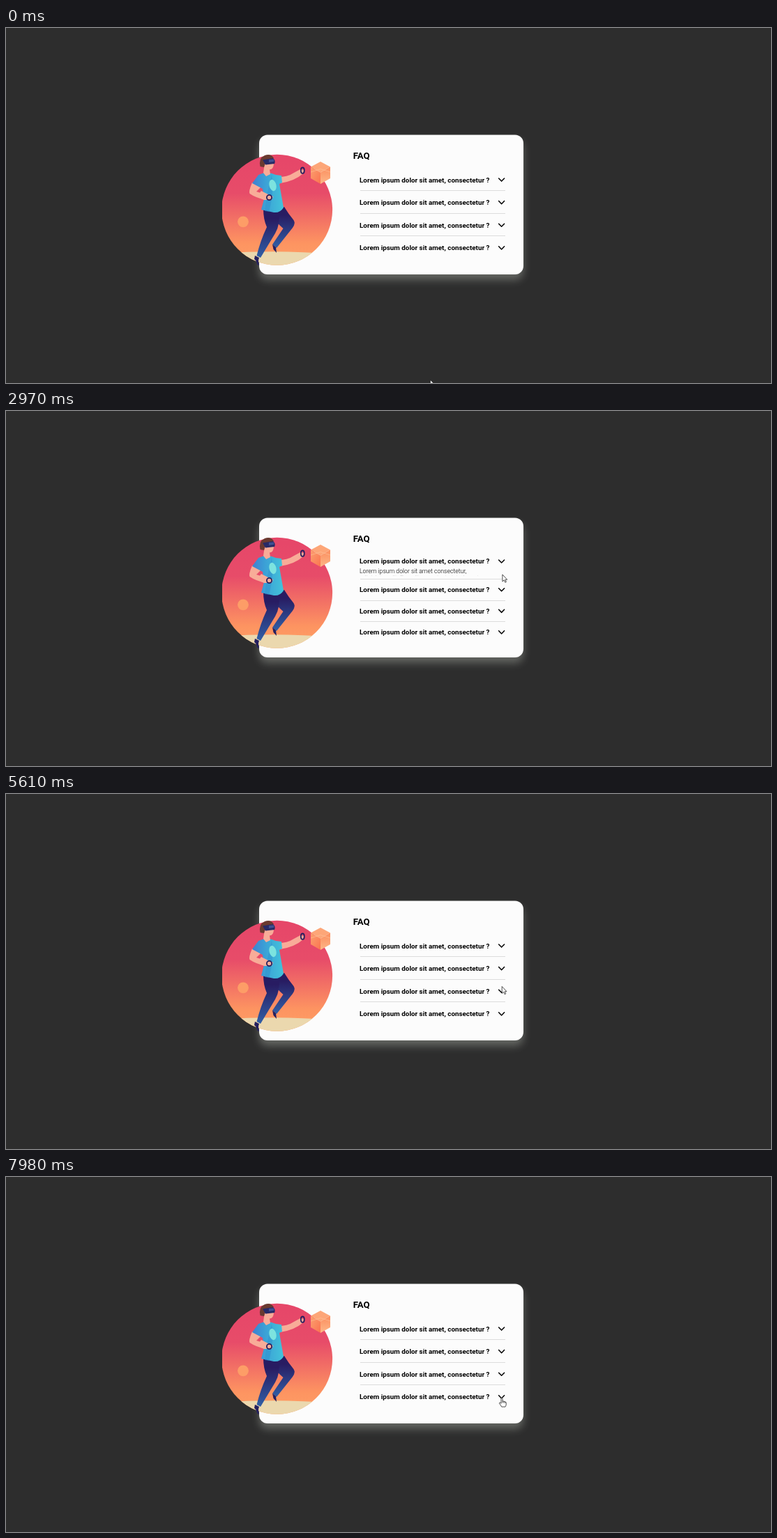
An HTML page for the animation above (8000 ms loop, 1097 by 510 pixels).

```html
<!DOCTYPE html>
<html lang="en">
<head>
<meta charset="utf-8">
<title>FAQ accordion</title>
<style>
  html, body { margin: 0; width: 100%; height: 100%; overflow: hidden; background: #2d2d2d; }
  svg { display: block; width: 1097px; height: 510px; font-family: Roboto, sans-serif; }
  .card { fill: #fcfcfc; filter: drop-shadow(0 8px 6px rgba(205, 212, 198, .34)); }
  .heading { font-size: 13.2px; font-weight: 700; }
  .question { font-size: 9.83px; font-weight: 700; }
  .answer { font-size: 8.7px; font-weight: 300; }
  .rule { stroke: #dcdcdc; }
  .chevron { fill: none; stroke: #000; stroke-width: 1.5; stroke-linecap: round; stroke-linejoin: round; }
  .skin { fill: #f8ac98; }
  .navy { fill: #25205f; }
</style>
</head>
<body>
<svg viewBox="0 0 1097 510">
  <defs>
    <linearGradient id="sky" x2="0" y2="1">
      <stop offset=".05" stop-color="#e64769"/>
      <stop offset=".35" stop-color="#e74c69"/>
      <stop offset=".8" stop-color="#fd9461"/>
      <stop offset="1" stop-color="#fea066"/>
    </linearGradient>
    <linearGradient id="shirt">
      <stop offset="0" stop-color="#3f7fd0"/>
      <stop offset=".4" stop-color="#3ba0d6"/>
      <stop offset="1" stop-color="#43c3da"/>
    </linearGradient>
    <linearGradient id="pants" x2="0" y2="1">
      <stop offset=".2" stop-color="#281c62"/>
      <stop offset="1" stop-color="#315fa6"/>
    </linearGradient>
    <linearGradient id="side" x2="1" y2="1">
      <stop offset="0" stop-color="#fba06f"/>
      <stop offset="1" stop-color="#fb7450"/>
    </linearGradient>
    <linearGradient id="front" x2="0" y2="1">
      <stop offset="0" stop-color="#fb8d5e"/>
      <stop offset="1" stop-color="#fdb787"/>
    </linearGradient>
    <clipPath id="frame"><path d="M310 150H480V350H310z"/></clipPath>
    <clipPath id="disc"><circle cx="388.6" cy="261.3" r="79.5"/></clipPath>
  </defs>

  <rect class="card" x="363" y="153.5" width="379" height="200.5" rx="12"/>

  <g clip-path="url(#frame)">
    <circle cx="388.6" cy="261.3" r="79.5" fill="url(#sky)"/>
    <path d="M305 324Q390 318 470 325V345H305z" fill="#ebd8ae" clip-path="url(#disc)"/>
    <circle cx="340" cy="278.3" r="7.9" fill="#fd9d67"/>
  </g>

  <g>
    <path d="M451 192 465 199.5 451 207.5 437 199.5z" fill="#fda678"/>
    <path d="M437 199.5 451 207.5V224L437 216z" fill="url(#side)"/>
    <path d="M465 199.5 451 207.5V224L465 216z" fill="url(#front)"/>
    <path d="M437 207 451 202.5 465 207" fill="none" stroke="#fec39b" stroke-width=".6"/>
  </g>

  <g>
    <path d="M384 261 399 257Q405 267 412.5 276Q415.5 281 411 287L388 316 382 311 397.5 288Q389 281 384 272z" fill="url(#pants)"/>
    <path d="M369 260 391 262Q394 281 386 295L365 330 359.5 327Q365 305 374 286Q369 275 369 260z" fill="url(#pants)"/>
    <path class="navy" d="M382 311 387 315 388 323 383.5 318zM357 327 363 330Q361 335 363 341L360.5 340Q359 334 356 332z"/>
    <path class="skin" d="M390 214Q404 214 411 209L422 203 427 204 426 209Q414 220 393 223z"/>
    <path class="skin" d="M353 222 366 228 359 235 375 240 382 241 382 246 374 247.5Q358 244 349.5 238Q347.5 235 353 222z"/>
    <path d="M362 211Q374 205 387 211L395 212 396 222 392 224 398 258Q393 266 384 265L366 261 370 246 368 231 353 223z" fill="url(#shirt)"/>
    <path d="M381 211Q385 235 377 264L371 263 374 240z" fill="#2e8dcd" opacity=".45"/>
    <path class="skin" d="M366 234 378 240 383 242 381 247 370 247 360 242z"/>
    <ellipse cx="382.5" cy="226" rx="5" ry="8.3" transform="rotate(-14 382.5 226)" fill="#7ce3df"/>
    <path class="skin" d="M371 194 384 194Q384 203 378 203.5L379 210 373 213 369 208z"/>
    <path d="M364.5 199Q362 187 371 183Q380 180 384 187L373 190 370 200z" fill="#6a3a30"/>
    <path d="M368 189.5 383 187Q387 190 385 195L372 196.5z" fill="#282a66"/>
    <path d="M377 189 384.5 188.5 384 192 377 193z" fill="#405092"/>
    <g fill="none" stroke="#25205f" stroke-width="1.8">
      <ellipse cx="425.3" cy="204.7" rx="2.5" ry="4.2"/>
      <circle cx="377.5" cy="243.5" r="3.6"/>
    </g>
  </g>

  <text class="heading" x="497.7" y="187.8">FAQ</text>
  <g id="list"></g>

  <g id="pointer" stroke="#222" stroke-width=".8" stroke-linejoin="round" fill="#fff">
    <path data-kind="arrow" d="M.4.4V10.4L2.8 8.3 4.3 11.7 5.9 11 4.4 7.7H7.2z"/>
    <path data-kind="hand" d="M-1 1Q0-.5 1 1V5.2Q2.2 4.4 3 5.6Q4.3 5 5 6.2Q6.2 6 6.2 7.5V10Q6 11.6 5 13.2H-.3Q-1.2 11.3-3.6 8.2Q-3.6 6.7-2.2 7.2L-1 8.4zM1 5.2V7.6M3 5.6V7.8M5 6.2V8"/>
    <path data-kind="beam" d="M-2-7H-.5L0-6.5.5-7H2M0-6.5V6.5M-2 7H-.5L0 6.5.5 7H2" fill="none"/>
  </g>
</svg>

<script>
const LOOP = 8000, FADE = 500, OPEN_HEIGHT = 55;
const ROW_TOP = 218.1, ROW_STEP = 32.6;
const QUESTION = 'Lorem ipsum dolor sit amet, consectetur ?';
const ANSWER = [
  'Lorem ipsum dolor sit amet consectetur,',
  'adipisicing elit. Expedita nesciunt sint placeat',
  'tempora ipsum? Facere eum quos ducimus ea.',
  'Magnam cum voluptas iste iure unde repudiandae',
  'numquam error.'
];

// Row, time of the opening click, time of the closing click
const toggles = [[0, 1534, 2715], [1, 3752, 4955], [2, 6065, 7190]];

// Time, x, y, pointer kind from then on
const moves = [
  [0, 608, 505, 'arrow'], [430, 608, 505, 'arrow'], [640, 552, 440, 'arrow'],
  [760, 544, 390, 'arrow'], [1000, 610, 280, 'arrow'], [1230, 660, 220, 'beam'],
  [1560, 660, 219, 'beam'], [1680, 661, 215.5, 'arrow'], [1900, 661, 215.5, 'arrow'],
  [2060, 663, 209, 'beam'], [2550, 663, 209, 'beam'], [2650, 706, 206, 'hand'],
  [2780, 715, 211, 'hand'], [2880, 713, 226, 'arrow'], [2970, 711.5, 234.5, 'arrow'],
  [3250, 711, 246, 'hand'], [3750, 711, 250, 'hand'], [3820, 710.5, 251, 'arrow'],
  [4200, 712, 260, 'arrow'], [4500, 711, 252, 'arrow'], [4800, 709, 234, 'hand'],
  [5060, 708.5, 233.5, 'hand'], [5250, 710, 248, 'arrow'], [5700, 711, 283, 'hand'],
  [6060, 711, 288, 'hand'], [6180, 711, 289.5, 'arrow'], [6500, 711, 289.5, 'arrow'],
  [6850, 711, 252, 'hand'], [7260, 711, 253, 'arrow'], [7500, 711, 285, 'arrow'],
  [7780, 711, 316.5, 'hand'], [LOOP, 711, 317, 'hand']
];

const list = document.getElementById('list');
const pointer = document.getElementById('pointer');

function add(parent, tag, attributes, text = '') {
  const node = document.createElementNS('http://www.w3.org/2000/svg', tag);
  for (const name in attributes) node.setAttribute(name, attributes[name]);
  node.textContent = text;
  return parent.appendChild(node);
}

// Each row is drawn around the middle of its question
const rows = Array.from({ length: 4 }, (_, index) => {
  const group = add(list, 'g', {});
  add(group, 'text', { class: 'question', x: 507, y: 3.4 }, QUESTION);
  const chevron = add(group, 'path', { class: 'chevron', d: 'M706.6-2.1 710.6 2 714.6-2.1' });
  const clip = add(add(group, 'clipPath', { id: 'clip' + index }), 'rect', { x: 500, y: 7, width: 225 });
  const answer = add(group, 'g', { class: 'answer', 'clip-path': `url(#clip${index})` });
  ANSWER.forEach((line, n) => add(answer, 'text', { x: 507, y: 16.7 + n * 10.4 }, line));
  const rule = index < 3 && add(list, 'path', { class: 'rule', d: 'M508 0H716' });
  return { group, chevron, clip, answer, rule };
});

// The CSS "ease" curve
function ease(x) {
  if (x <= 0 || x >= 1) return x <= 0 ? 0 : 1;
  const bezier = (a, b, s) => 3 * a * s * (1 - s) ** 2 + 3 * b * s * s * (1 - s) + s ** 3;
  let low = 0, high = 1;
  for (let i = 0; i < 20; i++) {
    const mid = (low + high) / 2;
    if (bezier(.25, .25, mid) < x) low = mid; else high = mid;
  }
  return bezier(.1, 1, low);
}

function drawRows(time) {
  const [active, opened, closed] = toggles.findLast(toggle => time >= toggle[1]) || toggles[0];
  const height = OPEN_HEIGHT * (ease((time - opened) / FADE) - ease((time - closed) / FADE));
  const isOpen = time >= opened && time < closed;

  // The rows are spaced evenly, so five gaps share the added height
  rows.forEach((row, i) => {
    const shift = -(i + 1) * height / 5 + (i > active ? height : 0);
    const middle = ROW_TOP + i * ROW_STEP + shift;
    const own = i === active ? height : 0;
    row.group.setAttribute('transform', `translate(0 ${middle})`);
    row.chevron.setAttribute('transform', isOpen && i === active ? 'rotate(180 710.6 -.6)' : '');
    row.clip.setAttribute('height', 3 + own);
    row.answer.setAttribute('visibility', own > .01 ? 'visible' : 'hidden');
    if (row.rule) row.rule.setAttribute('transform', `translate(0 ${Math.round(middle + 14.8 + own) + .5})`);
  });
}

function drawPointer(time) {
  const i = moves.findLastIndex(move => time >= move[0]);
  const [start, x, y, kind] = moves[i];
  const [end, nextX, nextY] = moves[i + 1];
  const part = (time - start) / (end - start);
  const at = `translate(${x + (nextX - x) * part} ${y + (nextY - y) * part})`;
  pointer.setAttribute('transform', at);
  for (const shape of pointer.children) {
    shape.setAttribute('visibility', shape.dataset.kind === kind ? 'visible' : 'hidden');
  }
}

const began = performance.now();
function draw() {
  const time = (performance.now() - began) % LOOP;
  drawRows(time);
  drawPointer(time);
  requestAnimationFrame(draw);
}
draw();
</script>
</body>
</html>
```
